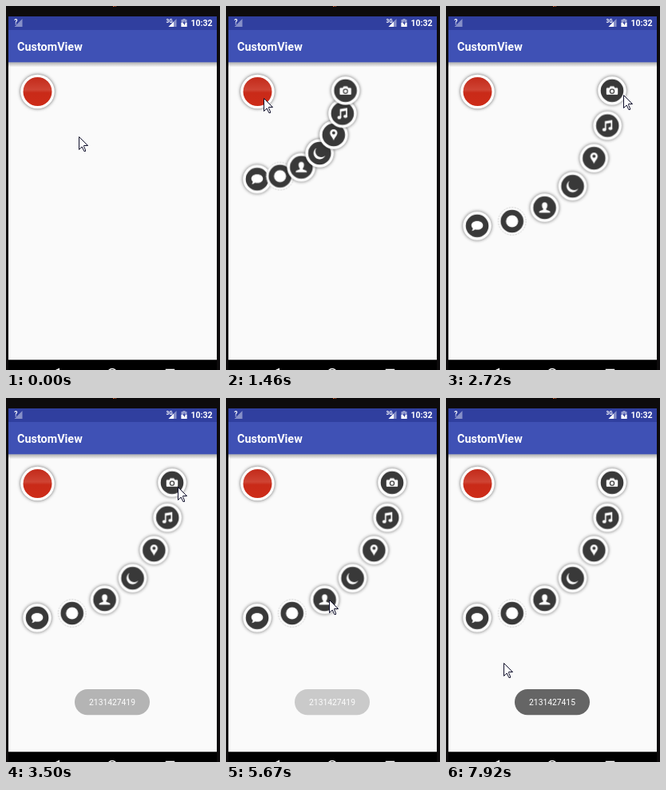
Write an HTML page that moves like this. It is 268 px wide and 455 px high and loops after 8000 ms.

```html
<!DOCTYPE html>
<html lang="en">
<head>
<meta charset="utf-8">
<title>Arc menu</title>
<style>
  html, body { margin: 0; width: 268px; height: 455px; overflow: hidden; background: #0d0b0c; }
  svg { display: block; }
  text { font-family: Roboto, sans-serif; fill: #fff; }
  .raised { filter: drop-shadow(0 .8px 2px rgba(0, 0, 0, .6)); }
  .glyph { fill: #fff; }
  .disc { fill: #393939; }
</style>
</head>
<body>
<svg width="268" height="455" viewBox="0 0 268 455">
  <defs>
    <linearGradient id="red" x2="0" y2="1">
      <stop offset="0" stop-color="#c32a1a"/>
      <stop offset=".44" stop-color="#cf4434"/>
      <stop offset=".54" stop-color="#c92a18"/>
      <stop offset="1" stop-color="#cd2c19"/>
    </linearGradient>
    <linearGradient id="drop" x2="0" y2="1">
      <stop stop-color="#000" stop-opacity=".3"/>
      <stop offset="1" stop-color="#000" stop-opacity="0"/>
    </linearGradient>
  </defs>

  <path d="M134 0h2v1h-2zM137 0h1v1h-1z" fill="#c4562a"/>
  <rect x="3" y="13" width="261" height="429.500" fill="#fafafa"/>
  <rect x="3" y="13" width="261" height="17" fill="#303f9f"/>
  <rect x="3" y="30" width="261" height="40.400" fill="#3f51b5"/>
  <rect x="3" y="70.400" width="261" height="6" fill="url(#drop)"/>
  <rect x="3" y="442.500" width="261" height="13" fill="#000"/>

  <g font-weight="700">
    <path d="M20.500 16v10h-10zM213.500 16v10h-10z" fill="#8790c8"/>
    <text x="10.300" y="22.500" font-size="8.500">?</text>
    <text x="200.500" y="21" font-size="6.500">3G</text>
    <path d="M210 19.500v6.500h-6.500z" fill="#fff"/>
    <path d="M221.500 16h3v1h2v9h-7v-9h2z" fill="#98a0d0"/>
    <path d="M219.500 21h7v5h-7z" fill="#fff"/>
    <path d="M223.500 18l-2 4h1.500v2.500l2-4h-1.500z" fill="#303f9f"/>
    <text x="231.500" y="25.300" font-size="10.5">10:32</text>
  </g>
  <text x="14" y="56" font-size="14.400" font-weight="600">CustomView</text>

  <g fill="none" stroke="#fff" stroke-width="1.4">
    <path d="M67 452.500l-10 5h10z" fill="#fff" stroke="none"/>
    <circle cx="133" cy="459" r="5.500"/>
    <path d="M200.500 460v-5.500h10v5.500"/>
  </g>

  <g id="items"></g>
  <circle class="raised" cx="39.500" cy="107" r="21.300" fill="#fff"/>
  <circle cx="39.500" cy="107" r="18" fill="url(#red)"/>

  <g id="toast" text-anchor="middle" font-size="10.3">
    <rect x="86" y="364" width="94" height="32.300" rx="16" fill="#656565"/>
    <text id="label" x="133" y="384.300">2131427419</text>
    <text id="label2" x="133" y="384.300">2131427415</text>
  </g>
  <g id="cursor">
    <circle id="click" cx="9" cy="9" r="30" fill="#ffeb3b"/>
    <path d="M.5.500V16.500L4.200 13 6.800 18.500H8.500V17L6.500 12.500V11.500H11.500Z" fill="#fff" stroke="#10102c"/>
  </g>
</svg>

<script>
const LOOP = 8000, TICK = 78;
const $ = id => document.getElementById(id);
const move = (x, y) => `translate(${x}px, ${y}px)`;
const smooth = p => p * p * p * (p * (6 * p - 15) + 10);
const swing = p => (1 - Math.cos(Math.PI * Math.min(1, p))) / 2;

// Rows are [time, value]; a value holds until the next row.
function play(el, prop, rows) {
  const frames = [...rows, [LOOP, rows.at(-1)[1]]].map(([t, v]) =>
    ({ offset: t / LOOP, [prop]: v, easing: 'steps(1, end)' }));
  el.animate(frames, { duration: LOOP, iterations: Infinity });
}

// Screen updates from the first to the last, about one per tick
function ticks(first, last) {
  const n = Math.round((last - first) / TICK);
  return Array.from({ length: n + 1 }, (_, k) => first + (last - first) * k / (n || 1));
}

// Eased legs [first update, last update, ...end values]
function travel(start, legs, format) {
  let from = start;
  const rows = legs.flatMap(([first, last, ...to]) => {
    const base = from;
    from = to;
    return ticks(first, last).map((t, k, all) => {
      const p = smooth((k + 1) / all.length);
      return [t, format(...base.map((v, i) => v + (to[i] - v) * p))];
    });
  });
  return [[0, format(...start)], ...rows];
}

// From the bottom of the arc to its right end
const glyphs = {
  chat: `<path class="glyph" d="M0-6C4.500-6 7.300-3.600 7.300-.500S4.500 4.800 0 4.800q-1.400 0-2.600-.300Q-4.500 6.300-7 6.300-5.300 5-5.400 3.100-7.300 1.700-7.300-.500C-7.300-3.600-4.500-6 0-6z"/>`,
  ring: `<circle class="glyph" r="7.600"/>`,
  user: `<path class="glyph" d="M0-6.800c2.500 0 3.600 1.900 3.400 4C3.300-1 2.700.400 1.900 1.200v1.300L5.800 4q1.200.600 1.200 2.300H-7Q-7 4.600-5.800 4l3.900-1.500V1.200C-2.700.400-3.300-1-3.400-2.800-3.600-4.900-2.500-6.800 0-6.800z"/>`,
  moon: `<path class="glyph" d="M-4-6.500A7.600 7.600 0 1 0 7 3 7.300 7.300 0 0 1-4-6.500z"/>`,
  pin: `<path class="glyph" d="M0-7A4.600 4.600 0 0 1 4.600-2.400C4.600.800 1.400 3.200 0 7-1.400 3.200-4.600.800-4.600-2.400A4.600 4.600 0 0 1 0-7z"/><circle class="disc" cy="-2.500" r="1.900"/>`,
  music: `<path class="glyph" d="M-3.300-5.500L6-7V3.500h-1.700V-3.400L-1.600-2.500V5h-1.700z"/><ellipse class="glyph" cx="-4" cy="5" rx="2.500" ry="2"/><ellipse class="glyph" cx="3.700" cy="3.600" rx="2.500" ry="2"/>`,
  camera: `<path class="glyph" d="M-6.200-3.500H-3.400L-2.300-5.500H2.300L3.400-3.500H6.200Q7.200-3.500 7.200-2.500V4Q7.200 5 6.200 5H-6.200Q-7.200 5-7.200 4V-2.500Q-7.200-3.500-6.200-3.500z"/><circle class="disc" cy=".7" r="3.200"/><circle class="glyph" cy=".7" r="2"/>`
};
const rim = `<circle class="raised" r="17.800" fill="#fff"/>`;
const dashes = `<circle r="17.300" fill="#fafafa" stroke="#c4c4c4" stroke-width=".8" stroke-dasharray="2 1.5"/>`;
$('items').innerHTML = Object.entries(glyphs).map(([name, g]) =>
  `<g>${name === 'ring' ? dashes : rim}<circle class="disc" r="14.300"/>${g}</g>`).join('');

// Items fly out along a quarter circle
const opening = ticks(1210, 1700);
[...$('items').children].forEach((el, i, all) => {
  const a = Math.PI / 2 * (1 - i / (all.length - 1));
  const at = r => move(39 + r * Math.cos(a), 105.800 + r * Math.sin(a));
  play(el, 'transform', [[0, at(0)], ...opening.map(t => [t, at(169 * swing((t - 1155) / 500))])]);
});
play($('items'), 'opacity', [[0, 0], [opening[0], 1]]);

play($('cursor'), 'transform', travel([91, 163], [
  [70, 230, 47, 82], [370, 450, 37, 73], [520, 670, 47, 115],
  [1860, 1940, 47, 113],
  [2160, 2640, 239, 109], [2720, 2720, 222, 111], [2790, 2940, 215, 111],
  [4650, 4650, 212, 114], [4730, 5130, 156, 321], [5210, 5450, 129, 252],
  [7700, 7920, 72, 331]
], move));

const clicks = [[990, 1070], [3100, 3260], [5830, 5990]];
play($('click'), 'opacity', [[0, 0], ...clicks.flatMap(([on, off]) => [[on, .35], [off, 0]])]);

play($('toast'), 'opacity', travel([0], [
  [3420, 3660, .93], [3800, 3800, 1], [5520, 5820, 0],
  [6150, 6455, .93], [7700, 7700, 1]
], v => v));
play($('label'), 'opacity', [[0, 1], [5990, 0]]);
play($('label2'), 'opacity', [[0, 0], [5990, 1]]);
</script>
</body>
</html>
```
